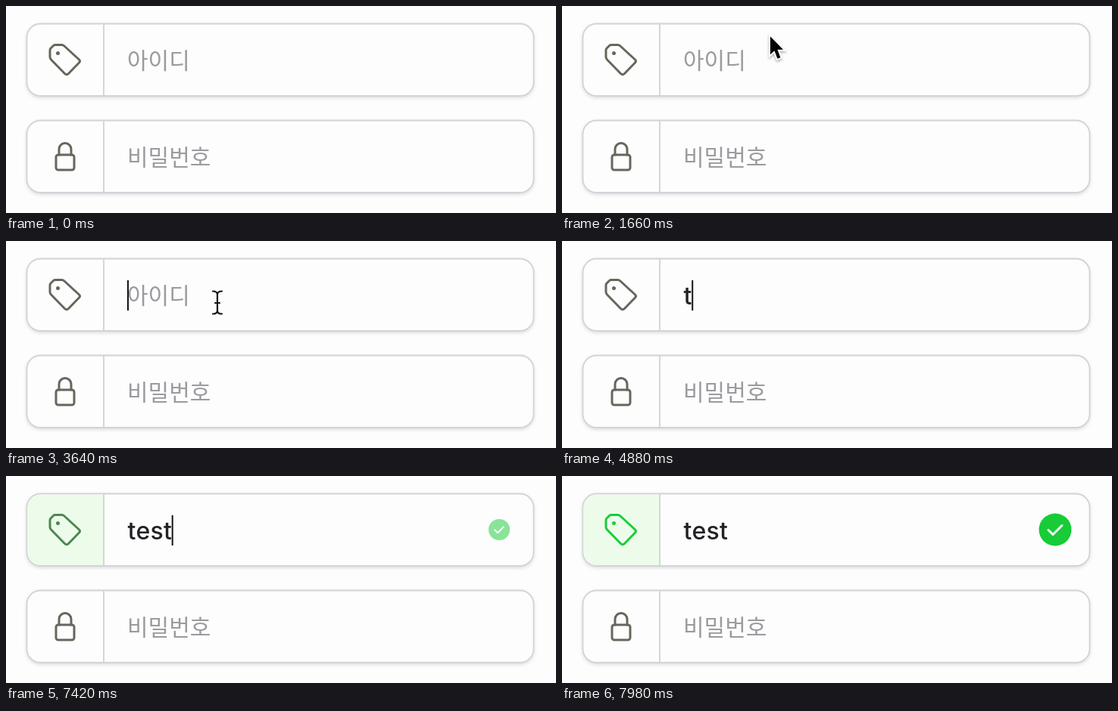
An HTML page for the animation above (8000 ms loop, 726x274 px).

```html
<!DOCTYPE html>
<html lang="ko">
<head>
<meta charset="utf-8">
<title>로그인 입력창</title>
<style>
  html, body { margin: 0; width: 100%; height: 100%; overflow: hidden; background: #fdfdfd; }
  svg { display: block; width: 100%; height: 100%; }
  .box { fill: #fdfdfd; stroke: #d3d3d8; stroke-width: 1.8; filter: drop-shadow(0 2px 2px rgba(60, 60, 80, .16)); }
  .rule { stroke: #d6d6d4; stroke-width: 2; }
  .icon { fill: none; stroke: #66665c; stroke-width: 3; stroke-linejoin: round; stroke-linecap: round; }
  .hint { font: 500 30px "Noto Sans CJK KR", "Noto Sans CJK", sans-serif; fill: #9b9a9f; }
  #typed { font: 450 32px Inter, sans-serif; letter-spacing: .3px; fill: #222226; }
</style>
</head>
<body>
<svg viewBox="0 0 726 274">
  <rect class="box" x="27.5" y="23.5" width="669" height="95.5" rx="18"/>
  <path id="tint" fill="#edfcea" d="M128.5 24.5V118H45.5A17 17 0 0 1 28.5 101V41.5A17 17 0 0 1 45.5 24.5Z"/>
  <path class="rule" d="M129 24V118.5"/>
  <g id="tag" class="icon">
    <path d="M65 51.5H73.5Q75.5 51.5 77 53L96.5 71Q98.5 73 96.500 75L82.500 89.500Q80 92 77.500 89.500L60 71.500Q58 69.500 58 67.500V58.500Q58 57 59 56L62.500 52.500Q63.500 51.500 65 51.500Z"/>
    <circle id="hole" cx="68.500" cy="62.500" r="2.500" stroke="none"/>
  </g>
  <text id="hint" class="hint" x="160" y="82.500">아이디</text>
  <text id="typed" x="160.500" y="84"></text>
  <rect id="caret" y="52" width="2" height="40" fill="#151518"/>
  <g id="check">
    <circle r="21.500" fill="#17cc36"/>
    <path d="M-9 .5L-3 6.500L9 -5.500" fill="none" stroke="#fdfdfd" stroke-width="3" stroke-linecap="round" stroke-linejoin="round"/>
  </g>

  <rect class="box" x="27.500" y="151.500" width="669" height="95.500" rx="18"/>
  <path class="rule" d="M129 152V246.500"/>
  <g class="icon">
    <rect x="66" y="197" width="24" height="20" rx="3"/>
    <path d="M70 197V189.500A8 8 0 0 1 86 189.500V197"/>
  </g>
  <text class="hint" x="160" y="210.500">비밀번호</text>

  <path id="arrow" d="M0 0V24L5.500 19L9.500 29.500L13.500 28L9.500 17.500H17Z" fill="#000" stroke="#fff" stroke-width="4"
    paint-order="stroke" style="filter:drop-shadow(0 2px 1.500px rgba(0,0,0,.3))"/>
  <path id="beam" d="M273 66.500Q279 66.500 279 71Q279 66.500 285 66.500M279 70V93M273 96.500Q279 96.500 279 92Q279 96.500 285 96.500M276 82H282"
    fill="none" stroke="#151518" stroke-width="2.200" stroke-linecap="round"/>
</svg>
<script>
const LOOP = 8000;
const KEYS = [[4800, "t"], [5300, "te"], [5760, "tes"], [6340, "test"]];
const $ = id => document.getElementById(id);
const set = (id, name, value) => $(id).setAttribute(name, value);
const ramp = (t, a, b) => Math.min(1, Math.max(0, (t - a) / (b - a)));
const lerp = (a, b, p) => a + (b - a) * p;
const mix = (a, b, p) => `rgb(${a.map((v, i) => Math.round(lerp(v, b[i], p)))})`;
const smooth = p => p * p * (3 - 2 * p);
const outBack = (p, k) => 1 + (k + 1) * (p - 1) ** 3 + k * (p - 1) ** 2;

function drawPointer(t) {
  const p = ramp(t, 1280, 1960);
  const x = lerp(231, 279, 1 - (1 - p) ** 3);
  const y = lerp(-20, 82, smooth(p));
  set("arrow", "transform", `translate(${x} ${y})`);
  set("arrow", "opacity", +(t >= 1280 && t < 3500));
  set("beam", "opacity", +(t >= 3500 && t < 4800));
}

function drawInput(t) {
  const text = KEYS.reduce((last, [at, s]) => t >= at ? s : last, "");
  if ($("typed").textContent !== text) $("typed").textContent = text;
  set("hint", "opacity", +!text);
  set("caret", "x", 160 + (text ? $("typed").getComputedTextLength() : 0));
  set("caret", "opacity", ramp(t, 3500, 3640) * (1 - ramp(t, 7880, 7970)));
}

function drawValid(t) {
  const color = mix([102, 102, 92], [23, 206, 58], ramp(t, 7160, 7960));
  $("tag").style.stroke = color;
  set("hole", "fill", color);
  set("tint", "opacity", ramp(t, 7160, 7420));
  const scale = Math.max(0, outBack(ramp(t, 7309, 7980), 2));
  set("check", "transform", `translate(651 71) scale(${scale})`);
  set("check", "opacity", ramp(t, 7309, 7530));
}

function frame(now) {
  const t = now % LOOP;
  drawPointer(t);
  drawInput(t);
  drawValid(t);
}

const start = performance.now();
function tick() {
  frame(performance.now() - start);
  requestAnimationFrame(tick);
}
tick();
</script>
</body>
</html>
```
